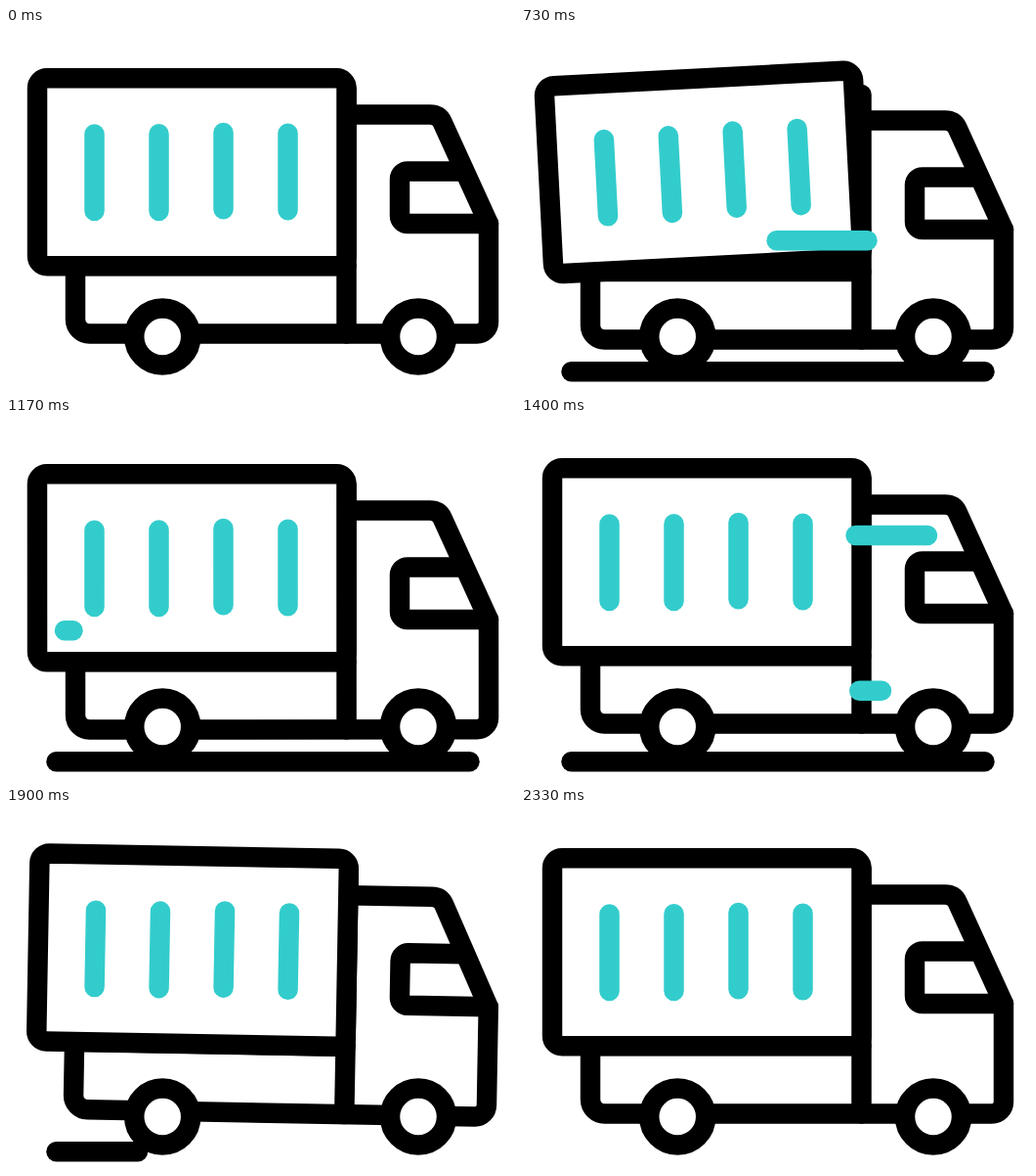
These frames come from a looping animation (521 by 370 pixels, 2.5 s). An HTML page:

```html
<!DOCTYPE html>
<html lang="en">
<head>
<meta charset="utf-8">
<title>Truck on the road</title>
<style>
  html, body { margin: 0; width: 100%; height: 100%; overflow: hidden; background: #fff; }
  svg { display: block; width: 100%; height: 100%; }
  .ink, .teal {
    fill: none; stroke: #000; stroke-width: 20.5;
    stroke-linecap: round; stroke-linejoin: round;
  }
  .teal { stroke: #33cccc; }
  .solid { fill: #fff; }
</style>
</head>
<body>
<svg viewBox="0 0 521 370">
  <line id="ground" class="ink" y1="351.2" y2="351.2"/>
  <g id="body">
    <g class="ink">
      <path d="M348.5 243H71V298A14.5 14.5 0 0 0 85.5 312.4H482A12 12 0 0 0 494 300.4V200L446.5 96Q443 88.5 434 88.5H348.5"/>
      <path d="M348.5 62V312.4"/>
      <path d="M468 146.5H411A8 8 0 0 0 403 154.5V192A8 8 0 0 0 411 200H494"/>
    </g>
    <g id="box">
      <rect class="ink solid" x="32" y="51.2" width="316.5" height="192" rx="10"/>
      <path class="teal" d="M90.5 108.6V187M156.5 108.3V187M222.5 107V185.2M288.5 107.8V186.2"/>
    </g>
  </g>
  <circle class="ink solid" cx="160.2" cy="315.6" r="29"/>
  <circle class="ink solid" cx="422" cy="315.6" r="29"/>
  <g id="wind"></g>
</svg>
<script>
  const LOOP = 2500, SPEED = 0.65, LAG = 143;

  // Each row: time, then the values held at that time.
  const bodyKeys = [
    [70, 0, 0], [570, 6, 0], [740, 6, 0], [960, -2.6, -1.08], [1190, 6.2, 0], [1390, 0, 0],
    [1640, 0, 0], [1840, -1.4, 1.2], [1900, -0.5, 1.03], [2180, 2.6, 0], [2330, 0, 0]
  ];
  const tiltKeys = [[650, 0], [850, -8.3], [1106, 0]];
  const groundLeft = [[200, 474.5], [640, 51.5]];
  const groundRight = [[1640, 474.5], [2005, 51.5]];
  const gusts = [
    { y: 217.3, from: 400, to: 60, start: 518 },
    { y: 120, from: 416, to: 150, start: 1288 },
    { y: 278.7, from: 369, to: 120, start: 1366 }
  ];

  const $ = id => document.getElementById(id);
  const clamp = (v, lo, hi) => Math.min(hi, Math.max(lo, v));
  const ease = p => p * p * (3 - 2 * p);

  function sample(keys, t) {
    if (t <= keys[0][0]) return keys[0].slice(1);
    for (let i = 1; i < keys.length; i++) {
      const [a, ...from] = keys[i - 1], [b, ...to] = keys[i];
      if (t < b) {
        const p = ease((t - a) / (b - a));
        return from.map((v, k) => v + (to[k] - v) * p);
      }
    }
    return keys[keys.length - 1].slice(1);
  }

  function setSpan(line, left, right) {
    line.setAttribute('x1', left);
    line.setAttribute('x2', right);
    line.style.display = right - left > 0.5 ? '' : 'none';
  }

  for (const g of gusts) {
    g.line = document.createElementNS('http://www.w3.org/2000/svg', 'line');
    g.line.setAttribute('class', 'teal');
    g.line.setAttribute('y1', g.y);
    g.line.setAttribute('y2', g.y);
    $('wind').append(g.line);
  }

  function draw(t) {
    const [dy, turn] = sample(bodyKeys, t);
    const [tilt] = sample(tiltKeys, t);
    $('body').setAttribute('transform', `translate(0 ${dy}) rotate(${turn} 282 190)`);
    $('box').setAttribute('transform', `rotate(${tilt} 77 216)`);
    setSpan($('ground'), sample(groundLeft, t)[0], sample(groundRight, t)[0]);
    for (const { line, from, to, start } of gusts) {
      const at = time => clamp(from - (time - start) * SPEED, to, from);
      setSpan(line, at(t), at(t - LAG));
    }
  }

  const origin = performance.now();
  function tick() {
    draw((performance.now() - origin) % LOOP);
    requestAnimationFrame(tick);
  }
  tick();
</script>
</body>
</html>
```
